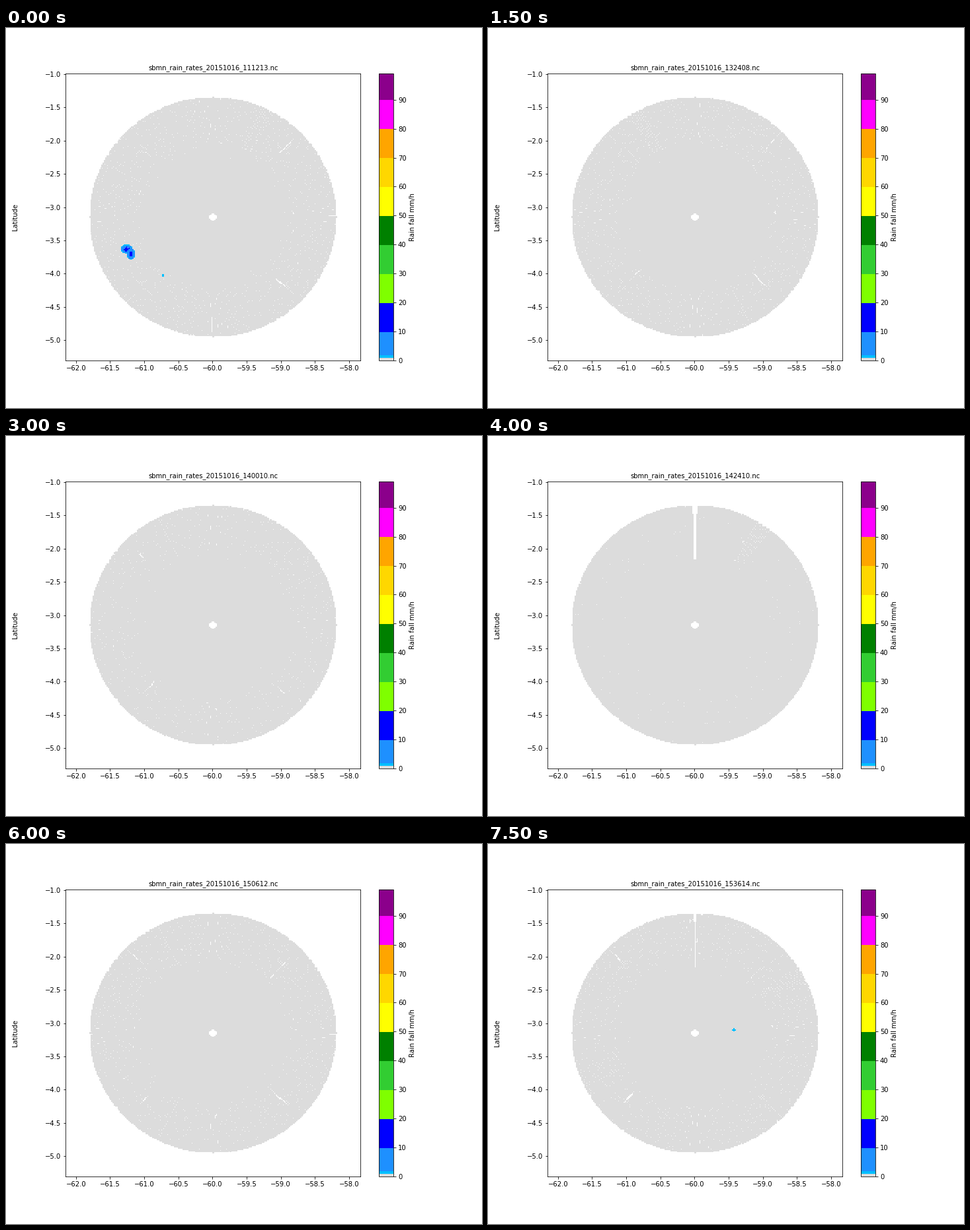
Recreate the animation shown at these times as a matplotlib script. Size 720 px wide and 576 px high, loop 8000 ms.

```python
import numpy as np
import matplotlib.pyplot as plt
from matplotlib.animation import FuncAnimation
from matplotlib.cm import ScalarMappable
from matplotlib.colors import BoundaryNorm, ListedColormap

plt.rcParams.update({"font.family": "DejaVu Sans", "font.size": 10,
                     "text.kerning_factor": 6, "pcolormesh.snap": False})

LON, LAT = -59.992, -3.149
KM_Y = 1 / 111.19                          # degrees per km
KM_X = KM_Y / np.cos(np.radians(LAT))
REACH, STEP = 200, 2                       # radar range and cell size, km

LEVELS = [0, 1, 2, *range(10, 100, 10), 99]
CMAP = ListedColormap(["gainsboro", "deepskyblue", "dodgerblue", "blue",
                       "chartreuse", "limegreen", "green", "yellow", "gold",
                       "orange", "magenta", "darkmagenta"])
NORM = BoundaryNorm(LEVELS, CMAP.N)

SCANS = ("111213 112410 131212 132408 133612 134813 140010 141214 "
         "142410 143612 144815 150009 150612 151210 152411 153614").split()

# per scan: azimuth of a badly sampled wedge, half width of a blocked beam,
# rain cells as (x, y, x radius, y radius, peak) in km from the radar
WEDGES = {0: 26, 3: -29, 8: 34, 10: -52, 13: 115, 15: 60}
BLOCKED = {8: 2, 15: 0}
RAIN = {0: [(-140, -53, 9, 7, 17), (-133, -61, 6, 9, 17),
            (-81, -97, 4, 4, 1.9)],
        15: [(64, 6, 4, 4, 1.9)]}

axis = np.arange(-REACH, REACH + 1, STEP)
X, Y = np.meshgrid(axis, axis)
R = np.hypot(X, Y)
AZ = np.degrees(np.arctan2(X, Y)) % 360
RAY = AZ.astype(int) % 360


def rain_rate(n, rng):
    z = np.zeros(X.shape)
    for x, y, a, b, peak in RAIN.get(n, []):
        d = ((X - x) / a) ** 2 + ((Y - y) / b) ** 2
        rough = rng.uniform(.8, 1.2, X.shape) if peak > 2 else 1
        z = np.maximum(z, peak * np.exp(-2.4 * d) * rough)
    return z


def missed(n, rng):
    """Cells that fall midway between two neighbouring rays."""
    dip = np.exp(-((n - 8) / 2) ** 2)      # the clearest scan is number 8
    share = .03 * (1 - .93 * dip)
    start = rng.uniform(108, 122)
    mid = .5 + rng.normal(0, .05, 360)[RAY]
    width = share * rng.uniform(.3, 1.7, 360)[RAY]
    width *= np.clip((R - start) / 12, 0, 1)
    if n in WEDGES:
        off = (AZ - WEDGES[n] + 180) % 360 - 180
        width = np.where((abs(off) < 4) & (R > 125), .12, width)
    hole = abs(AZ % 1 - mid) < width
    hole |= (R > start - 15) & (rng.random(X.shape) < .003)

    for sx, sy in ((1, 1), (1, -1), (-1, -1), (-1, 1)):
        r0, size = rng.uniform(115, 175), rng.uniform(8, 45) * (1 - dip)
        hole |= (X * sx == Y * sy) & (X * sx > 0) & (R > r0) & (R < r0 + size)
    if n in BLOCKED:
        half = BLOCKED[n] + STEP * (Y > 185)
        hole |= (abs(X) <= half) & (Y >= 110)
    return hole


fig = plt.figure(figsize=(10, 8), dpi=72, facecolor="white")
ax = fig.add_axes([.125, .125, .62, .755])
ax.set_xlim(LON - 240 * KM_X, LON + 240 * KM_X)
ax.set_ylim(LAT - 240 * KM_Y, LAT + 240 * KM_Y)
ax.set_ylabel("Latitude", labelpad=40)
title = ax.set_title("", fontsize=10)
mesh = ax.pcolormesh(LON + axis * KM_X, LAT + axis * KM_Y, np.zeros(X.shape),
                     cmap=CMAP, norm=NORM, shading="nearest", zorder=1)

cax = fig.add_axes([.78375, .125, .0302, .755])
bar = fig.colorbar(ScalarMappable(NORM, CMAP), cax=cax,
                   spacing="proportional", ticks=range(0, 100, 10))
bar.minorticks_off()
bar.solids.set_snap(False)
bar.set_label("Rain fall mm/h")


def draw(n):
    rng = np.random.default_rng(40 + n)
    z = rain_rate(n, rng)
    gaps = missed(n, rng) & (z < 1)
    gaps |= (z > 16) | (R > REACH) | (R < 6.5)
    mesh.set_array(np.ma.array(z, mask=gaps))
    title.set_text(f"sbmn_rain_rates_20151016_{SCANS[n]}.nc")
    return mesh, title


anim = FuncAnimation(fig, draw, frames=len(SCANS), interval=500,
                     init_func=lambda: [], repeat=True, repeat_delay=0,
                     blit=False)
plt.show()
```
